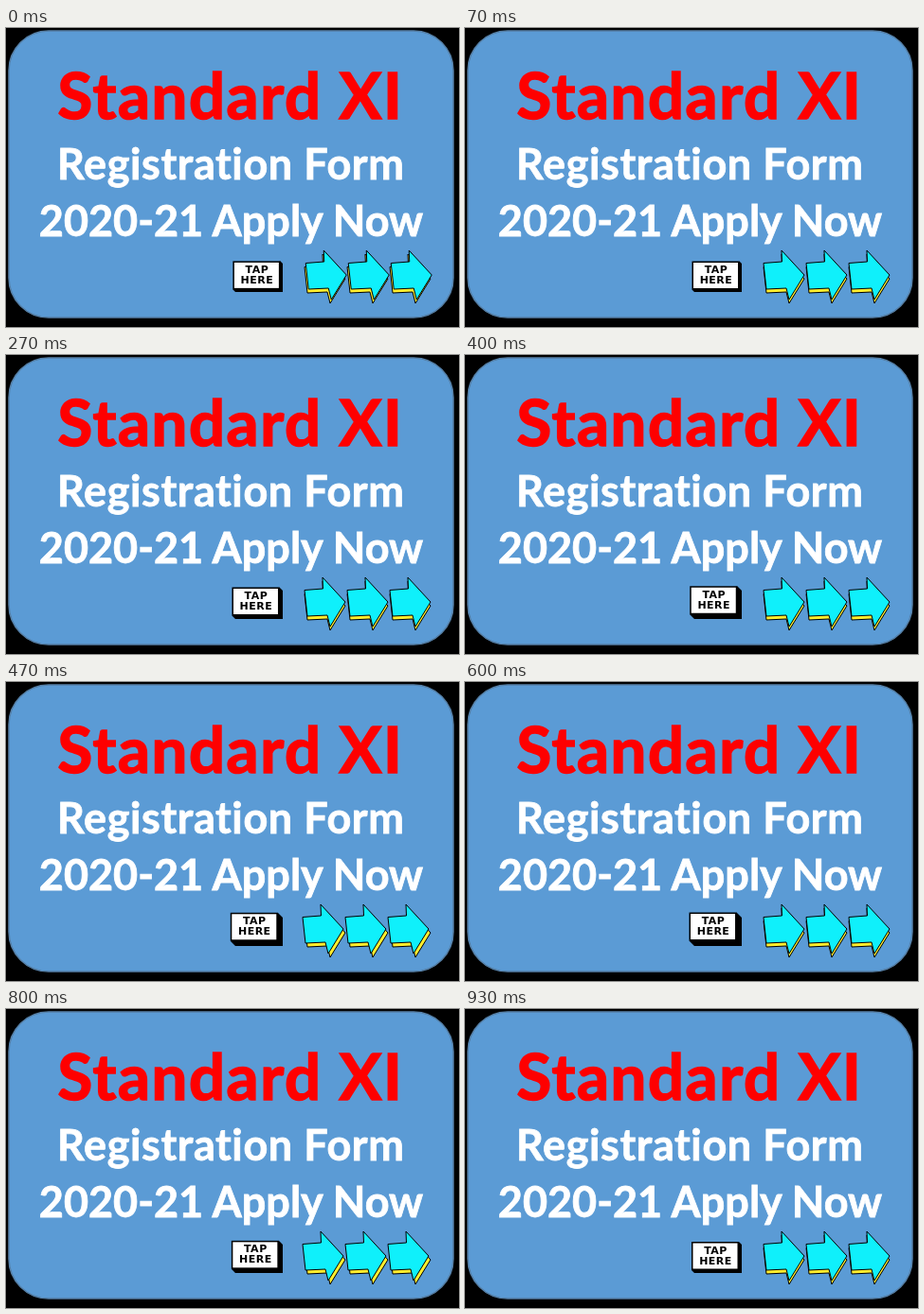
These frames come from a looping animation (478x316 px, 990 ms). An HTML page:

```html
<!DOCTYPE html>
<html lang="en">
<meta charset="utf-8">
<title>Standard XI Registration</title>
<style>
  html, body { margin: 0; width: 100%; height: 100%; overflow: hidden; background: #000; }
  svg { display: block; width: 478px; height: 316px; }
  .title { font-family: Lato, sans-serif; font-weight: 700; font-variant-ligatures: none; text-anchor: middle; }
  .label { font: 700 11px "DejaVu Sans", sans-serif; letter-spacing: .5px; text-anchor: middle; }
</style>
<svg viewBox="0 0 478 316">
  <defs>
    <path id="shape" d="M1 14.5 L20.5 13 L20 1 L44 27 L28 53 L25 41 L4 42 Z"/>
  </defs>
  <rect x="3" y="3" width="469" height="303" rx="42" fill="#5b9bd5" stroke="#557fa6" stroke-width="1.5"/>
  <g class="title" fill="#fff" stroke="#fff" stroke-width=".8">
    <text x="237" y="95.5" font-size="67" letter-spacing="1.6" fill="#fe0000" stroke="#fe0000" stroke-width="1.6">Standard XI</text>
    <text x="237.3" y="160" font-size="45" letter-spacing=".6">Registration Form</text>
    <text x="237.5" y="220" font-size="45">2020-21 Apply Now</text>
  </g>
  <path id="side"/>
  <g id="face">
    <rect x=".75" y=".75" width="48.5" height="28.5" fill="#fff" stroke="#000" stroke-width="1.5"/>
    <text class="label" x="25.5" y="12.5">TAP</text>
    <text class="label" x="25.5" y="23.5">HERE</text>
  </g>
  <g id="arrows" stroke="#000" stroke-linejoin="round"></g>
</svg>
<script>
  const LOOP = 990, STEP = 1000 / 15;
  const face = document.getElementById('face');
  const side = document.getElementById('side');
  const arrows = document.getElementById('arrows');
  const wave = (step, period) => Math.cos(2 * Math.PI * step / period);

  arrows.innerHTML = [314, 359, 404].map(x => `<g transform="translate(${x} 234)">
    <use href="#shape" y="4" fill="#ffee2e"/><use href="#shape" class="front" fill="#0ff0fb"/></g>`).join('');
  const fronts = arrows.querySelectorAll('.front');

  function draw(now) {
    const step = Math.floor((now % LOOP) / STEP + 0.06);

    // The button rises once per loop; its back corner stays put.
    const lift = 1.5 * (1 - wave(step - 1, 15));
    const x = 239.5 - lift, y = 246.5 - lift;
    face.setAttribute('transform', `translate(${x} ${y})`);
    side.setAttribute('d', `M${x + 50} ${y} L292 249 V279 H242 L${x} ${y + 30} Z`);

    // The arrow fronts sway three times per loop.
    const sway = 1.8 * (wave(step, 5) - 0.31);
    for (const front of fronts) front.setAttribute('x', sway);
    requestAnimationFrame(draw);
  }
  draw(performance.now());
</script>
</html>
```
